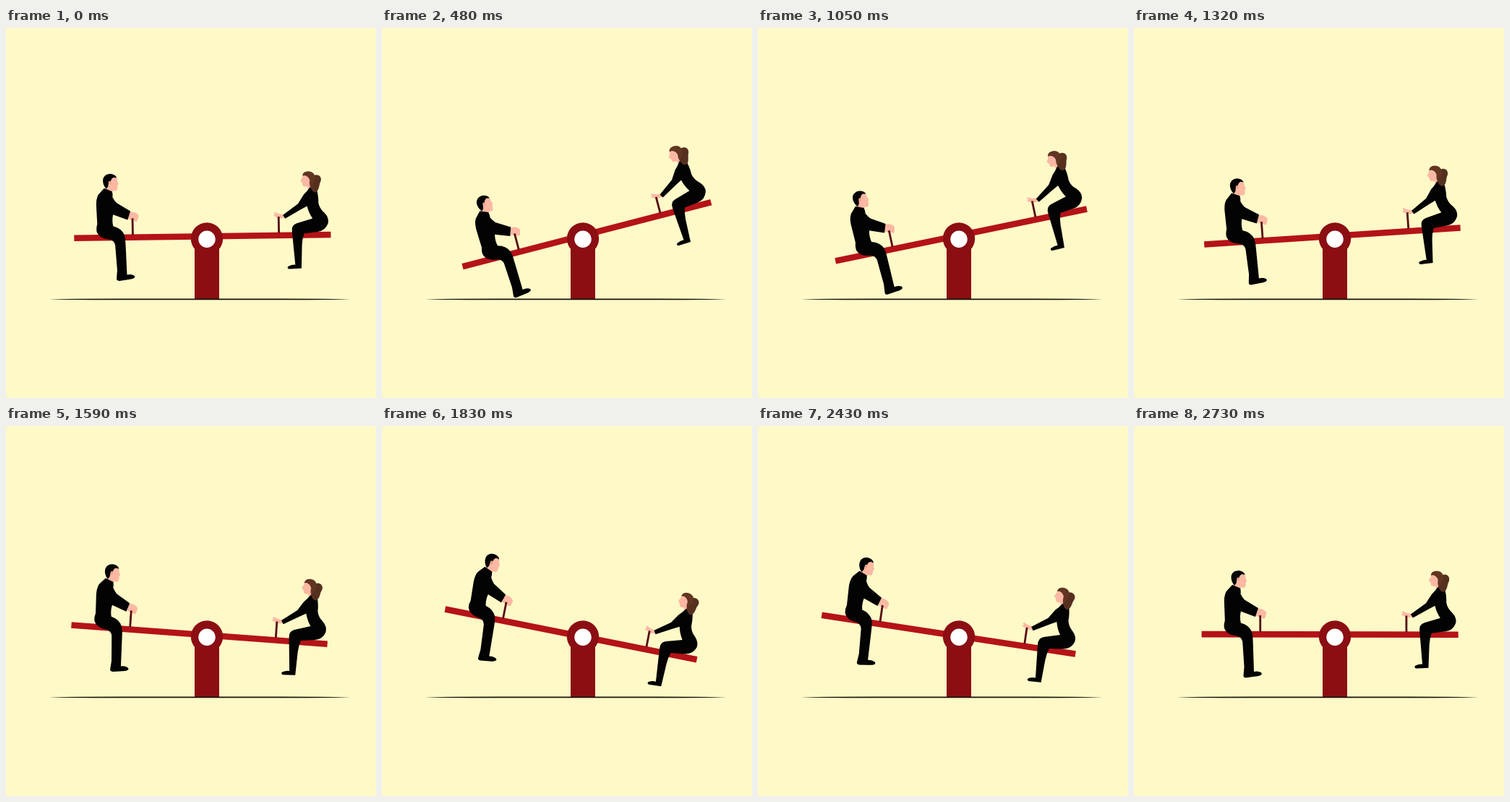
An HTML page with a canvas for the animation above (2.76 s loop, 512x512 px).

```html
<!DOCTYPE html>
<html lang="en">
<head>
<meta charset="utf-8">
<title>Seesaw</title>
<style>
  html, body { margin: 0; width: 100%; height: 100%; overflow: hidden; background: #fff9c8; }
  canvas { display: block; width: 100%; height: 100%; }
</style>
</head>
<body>
<canvas id="stage" width="512" height="512"></canvas>
<script>
const ctx = document.getElementById('stage').getContext('2d');

const LOOP = 2760, STEP = 30;
const LOW = { t: 720, deg: -21.2 };   // man's side down
const HIGH = { t: 2081, deg: 18.9 };  // woman's side down
const PIVOT = { x: 266.4, y: 239.2 };

const COLORS = {
  sky: '#fff9c8', plank: '#b41317', post: '#8b0e13', handle: '#560c10',
  ink: '#030303', skin: '#fbb8a3', ear: '#ee9c88', hair: '#613521', tail: '#55301f'
};

const MAN = {
  neck: 'M139 214 L150 218 L147 227 L138 223 Z',
  face: 'M145 204 L152.5 205 Q154.3 208 154.3 211 L156 215 L154.5 217 Q155 222 153 224 Q149 225.5 145 222 L142 213 Z',
  hair: 'M137 219 Q133.3 213 134.7 207 Q137 200.6 145 200.6 Q152 201.4 153.5 206.5 L149.5 205.5 Q146 206.5 145.3 210.5 L142.5 211 L141.5 218 L139 221.5 Z',
  ear: 'M142.5 211 Q145 209.5 145.5 212 Q145.5 215 143.5 216 Z',
  body: 'M136 220.5 L147 225 Q148 229 147.5 233 Q150 238 153 241 L172 252.5 L168 264.5 L148 257 Q146 265 148 273 Q160 276 163.5 286 Q165 292 165 300 L166.5 340.5 Q171 339.5 175 341 Q178 342 177 344.5 Q175 346.5 169 347 L156 348.8 Q152 349 152 346 L153 334 L150.5 299 Q149 292 141 291 Q129 290 125.3 281 Q124 276 126 270 L124.8 243 Q125 231 130 227 Z',
  hand: 'M171 253.5 Q177 252.5 181 256 Q184 258 183 261 L181.5 266.5 Q179 268 177 265.5 L173 264.5 L168.5 263 Z'
};

const WOMAN = {
  tail: 'M424 207 Q428 203.5 433 205.5 Q437 208 436 213 Q434 217 433.5 221 Q432 228 428 229 Q423 228 421.5 222 Q422 216 424 207 Z',
  neck: 'M415 215 L421 214 L425 225 L419 227 Z',
  face: 'M412 203.5 L420 204 L422 214 Q421 221 415 221 Q410.5 221.5 410.5 217 L409.3 215 L407.5 213 L410 209 Z',
  hair: 'M410.5 206 Q411 199.8 419 199.8 Q427 200.3 428 208 Q428 214 424 218 L421.5 223 Q419.5 217 420.5 212 Q419 207 414 205.5 Z',
  body: 'M420.5 222 L429.5 223 Q432.5 232 432.3 244 Q434 252 440 257 Q447 264 445.5 271.5 Q442 282 431 283.5 L412 286 Q409.5 293 409 302 L408 334 L391 334.8 Q387.5 334 389.5 331.2 Q395 328.5 399.5 329 L395.5 284 Q394 274 402 271.5 L424 265 Q419 258 416.5 248 L408 252.5 L386 265 L383 260 L404 244.5 L412 232 Q416 228.5 420.5 222 Z',
  hand: 'M384 259.5 L378.5 258.5 L372 255.8 Q369.5 256.5 372.5 259 L369.5 260.5 L374.5 263 L380 264.5 L386 263.5 Z'
};

function shape(d, color) {
  ctx.fillStyle = color;
  ctx.fill(new Path2D(d));
}

function disc(x, y, r, color) {
  ctx.fillStyle = color;
  ctx.beginPath();
  ctx.arc(x, y, r, 0, Math.PI * 2);
  ctx.fill();
}

function bar(x1, y1, x2, y2, width, color) {
  ctx.strokeStyle = color;
  ctx.lineWidth = width;
  ctx.beginPath();
  ctx.moveTo(x1, y1);
  ctx.lineTo(x2, y2);
  ctx.stroke();
}

// Steady swing from one side to the other and back
function tilt(t) {
  const span = HIGH.deg - LOW.deg, rise = HIGH.t - LOW.t;
  const s = (t - LOW.t + LOOP) % LOOP;
  return s < rise
    ? LOW.deg + span * s / rise
    : HIGH.deg - span * (s - rise) / (LOOP - rise);
}

function drawMan() {
  shape(MAN.neck, COLORS.skin);
  shape(MAN.face, COLORS.skin);
  shape(MAN.hair, COLORS.ink);
  shape(MAN.ear, COLORS.ear);
  shape(MAN.hand, COLORS.skin);
  shape(MAN.body, COLORS.ink);
  bar(174.8, 262.5, 175, 285.5, 2.8, COLORS.handle);
}

function drawWoman() {
  shape(WOMAN.neck, COLORS.skin);
  shape(WOMAN.face, COLORS.skin);
  shape(WOMAN.hand, COLORS.skin);
  shape(WOMAN.body, COLORS.ink);
  shape(WOMAN.tail, COLORS.tail);
  shape(WOMAN.hair, COLORS.hair);
  bar(377, 262, 377.2, 284.5, 2.8, COLORS.handle);
}

function drawSwing(deg) {
  ctx.save();
  ctx.translate(PIVOT.x, PIVOT.y);
  ctx.rotate(deg * Math.PI / 180);
  ctx.translate(-PIVOT.x, -PIVOT.y);
  bar(93.8, 289, 449, 287.8, 8.6, COLORS.plank);
  drawMan();
  drawWoman();
  ctx.restore();
}

function drawStand() {
  ctx.fillStyle = COLORS.post;
  ctx.fillRect(261, 292, 34, 83);
  disc(278, 291.5, 22.2, COLORS.post);
  disc(278, 292.2, 11.7, '#fff');
}

function draw(now) {
  const t = Math.floor((now % LOOP) / STEP) * STEP;
  ctx.fillStyle = COLORS.sky;
  ctx.fillRect(0, 0, 512, 512);
  drawSwing(tilt(t));
  drawStand();
  shape('M60 375.4 Q100 374.6 160 374.6 L380 374.6 Q436 374.6 476 375.4 Q436 376.2 380 376.2 L160 376.2 Q100 376.2 60 375.4 Z', '#15120c');
}

let start;
function tick(now) {
  if (start === undefined) start = now;
  draw(now - start);
  requestAnimationFrame(tick);
}
draw(0);
requestAnimationFrame(tick);
</script>
</body>
</html>
```
